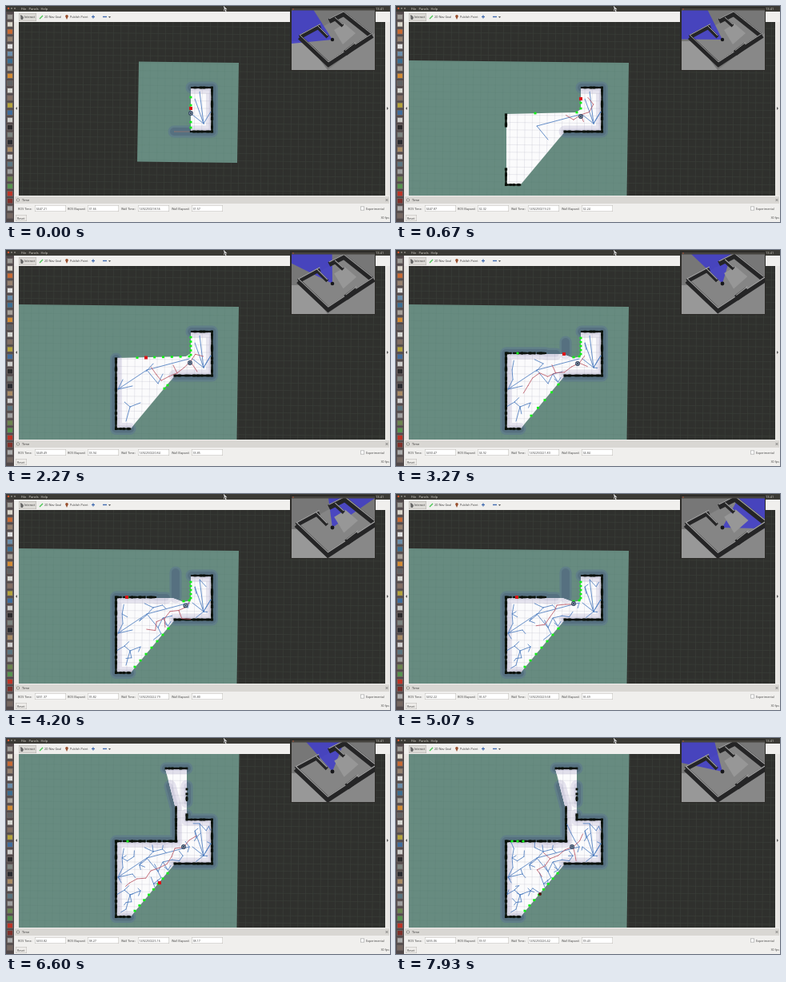
Animation of 480x270 px, one loop 8000 ms. Source, as an HTML page with a canvas:

```html
<!DOCTYPE html>
<html lang="en">
<head>
<meta charset="utf-8">
<title>Map exploration</title>
<style>
html, body { margin: 0; width: 100%; height: 100%; overflow: hidden; background: #30302e; }
canvas { display: block; width: 480px; height: 270px; }
</style>
</head>
<body>
<canvas id="stage" width="480" height="270"></canvas>
<script>
const ctx = document.getElementById('stage').getContext('2d');
const LOOP = 8000, STEP = 200 / 3;
const TIMES = [0, 670, 2270, 3270, 5070, 6600, 7930];

function seeded(seed) {
  return () => {
    seed = (seed * 1664525 + 1013904223) >>> 0;
    return seed / 4294967296;
  };
}

// Linear interpolation between the values listed at TIMES.
function at(values, t) {
  let i = 0;
  while (i < TIMES.length - 2 && t >= TIMES[i + 1]) i++;
  const k = (t - TIMES[i]) / (TIMES[i + 1] - TIMES[i]);
  return values[i] + (values[i + 1] - values[i]) * k;
}

function rect(x, y, w, h, color) {
  ctx.fillStyle = color;
  ctx.fillRect(x, y, w, h);
}

function trace(p, close) {
  ctx.beginPath();
  for (let i = 0; i < p.length; i += 2) ctx.lineTo(p[i], p[i + 1]);
  if (close) ctx.closePath();
}

function poly(p, color) {
  trace(p, true);
  ctx.fillStyle = color;
  ctx.fill();
}

function line(p, color, width = 1) {
  trace(p);
  ctx.strokeStyle = color;
  ctx.lineWidth = width;
  ctx.stroke();
}

function dot(x, y, r, color) {
  ctx.beginPath();
  ctx.arc(x, y, r, 0, 7);
  ctx.fillStyle = color;
  ctx.fill();
}

function text(s, x, y, color = '#3c3c3c', size = 3.7) {
  ctx.font = size + 'px "Open Sans", sans-serif';
  ctx.fillStyle = color;
  ctx.fillText(s, x, y);
}

// Known free space, from the first room to the final corridor.
const STAGES = [
  { start: 0, free: [231, 103, 257, 103, 257, 157, 231, 157] },
  { start: 330, free: [231, 103, 257, 103, 257, 157, 211, 157, 156, 223, 138, 223, 138, 135, 225, 133, 231, 129] },
  { start: 2730, free: [231, 103, 257, 103, 257, 157, 211, 157, 156, 223, 138, 223, 138, 130, 208, 130, 222, 135, 231, 133] },
  { start: 5530, free: [226, 38, 226, 103, 257, 103, 257, 157, 211, 157, 156, 223, 138, 223, 138, 130, 213, 130, 212, 88, 199, 38] }
];
const stageAt = t => STAGES.filter(s => s.start <= t).pop();

// Obstacles: black cells from `start`, inflated cost band from `halo`.
const WALLS = [
  { start: 0, halo: 0, p: [232, 102, 257.5, 102, 257.5, 157, 231, 157] },
  { start: 330, halo: 0, p: [231, 157, 211, 157] },
  { start: 330, halo: 1100, p: [137.5, 136, 137.5, 150] },
  { start: 330, halo: 1100, p: [137.5, 204, 137.5, 223.5, 155, 223.5] },
  { start: 1100, halo: 1100, p: [137.5, 150, 137.5, 204] },
  { start: 2730, halo: 2730, gaps: .2, p: [137.5, 129, 187, 129] },
  { start: 2730, halo: 2730, p: [137.5, 129, 137.5, 136] },
  { start: 9e9, halo: 2730, p: [187, 130, 200, 130] },
  { start: 5530, halo: 5530, gaps: .15, p: [187, 129, 213, 129] },
  { start: 5530, halo: 5530, p: [212.5, 129, 212.5, 86] },
  { start: 9e9, halo: 5530, p: [212, 86, 205, 60] },
  { start: 5530, halo: 5530, p: [200, 38, 226, 38] },
  { start: 5530, halo: 5530, gaps: .55, p: [226, 60, 226, 80] },
  { start: 5530, halo: 5530, p: [226, 96, 226, 102, 232, 102] }
];

function cells(p, gaps = 0) {
  const rnd = seeded(p[0] * 31 + p[1]), out = [];
  for (let i = 0; i + 3 < p.length; i += 2) {
    const [x, y, x2, y2] = p.slice(i, i + 4), n = Math.ceil(Math.hypot(x2 - x, y2 - y) / 2);
    for (let j = 0; j <= n; j++) {
      const size = 2 + rnd() * 1.3, skip = rnd() < gaps;
      if (!skip) out.push([x + (x2 - x) * j / n, y + (y2 - y) * j / n, size]);
    }
  }
  return out;
}
WALLS.forEach(w => { w.cells = cells(w.p, w.gaps); });

// Exploration tree: a few early branches, then seeded random growth.
const TREE = [];
const NODES = [];
function branch(start, p) {
  for (let i = 0; i + 3 < p.length; i += 2) TREE.push({ start, p: p.slice(i, i + 4) });
  for (let i = 0; i < p.length; i += 2) NODES.push([p[i], p[i + 1]]);
}
branch(0, [242, 107, 247, 147, 233, 136]);
branch(0, [236, 116, 247, 147, 256, 132]);
branch(400, [229, 136, 176, 150, 190, 167]);
branch(530, [256, 132, 251, 140, 247, 147]);
branch(930, [176, 150, 140, 174, 158, 170]);
branch(1200, [140, 174, 146, 162]);
branch(1400, [148, 190, 155, 196, 150, 214]);
branch(1700, [155, 196, 168, 191]);
branch(1930, [184, 142, 175, 152]);
branch(2130, [190, 167, 196, 155]);

function inside(p, x, y) {
  trace(p, true);
  return ctx.isPointInPath(x, y);
}

function grow(nodes, rnd, free, reach) {
  for (let tries = 0; tries < 60; tries++) {
    const x = 138 + rnd() * 120, y = 104 + rnd() * 119;
    if (!inside(free, x, y)) continue;
    let near = nodes[0], best = 1e9;
    for (const n of nodes) {
      const d = Math.hypot(n[0] - x, n[1] - y);
      if (d < best) { best = d; near = n; }
    }
    if (best < 4) continue;
    const k = Math.min(1, reach / best);
    const end = [near[0] + (x - near[0]) * k, near[1] + (y - near[1]) * k];
    if (!inside(free, (near[0] + end[0]) / 2, (near[1] + end[1]) / 2)) continue;
    nodes.push(end);
    return [...near, ...end];
  }
  return [0, 0, 0, 0];
}

const treeRnd = seeded(77);
for (let t = 2330; t < LOOP; t += 78) {
  TREE.push({ start: t, p: grow(NODES, treeRnd, stageAt(t).free, 12) });
}

const robotX = t => at([231, 231, 230, 227, 222, 222, 220], t);
const robotY = t => at([134, 138, 141, 142, 137, 136, 136], t);

// Local tree around the robot, restarted now and then.
const LOCAL = [];
for (let t = 330; t < LOOP; t += 1100) {
  const nodes = [[robotX(t), robotY(t)]], rnd = seeded(t + 9);
  for (let i = 0; i < 11; i++) {
    LOCAL.push({ start: t + i * 60, end: t + 1100, p: grow(nodes, rnd, stageAt(t).free, 11) });
  }
}

function drawGrid(color) {
  ctx.save();
  ctx.translate(245, 128);
  ctx.rotate(.011);
  ctx.beginPath();
  for (let i = -30; i <= 30; i++) {
    const d = i * 9.3;
    ctx.moveTo(d, -160); ctx.lineTo(d, 160);
    ctx.moveTo(-280, d); ctx.lineTo(280, d);
  }
  ctx.strokeStyle = color;
  ctx.lineWidth = .7;
  ctx.stroke();
  ctx.restore();
}

function drawHalos(t, color, width) {
  ctx.beginPath();
  for (const w of WALLS) {
    if (t < w.halo || (w.halo === 0 && w.start > t)) continue;
    ctx.moveTo(w.p[0], w.p[1]);
    for (let i = 2; i < w.p.length; i += 2) ctx.lineTo(w.p[i], w.p[i + 1]);
  }
  if (t < 330) { ctx.moveTo(231, 157); ctx.lineTo(210, 157); }
  if (t >= 2730 && t < 5530) {
    ctx.moveTo(212, 129);
    ctx.lineTo(212, t < 3900 ? 115 : 98);
  }
  ctx.strokeStyle = color;
  ctx.lineWidth = width;
  ctx.stroke();
}

function greens(x, y, x2, y2, n) {
  for (let i = 0; i < n; i++) {
    const k = n > 1 ? i / (n - 1) : 0;
    rect(x + (x2 - x) * k - 1.5, y + (y2 - y) * k - 1.3, 3, 2.7, '#12ef18');
  }
}

function drawFrontiers(t) {
  if (t < 330) {
    greens(231, 114, 231, 124, 2);
    greens(231, 145, 231, 152, 2);
  } else if (t < 1100) {
    greens(231, 121, 231, 128, 2);
    greens(174, 134, 226, 133, 2);
  } else if (t < 2730) {
    greens(164, 134.5, 229, 133, 7);
    greens(231, 109, 231, 131, 5);
    greens(198, 173, 202, 169, 2);
  } else if (t < 5530) {
    greens(231, 110, 231, 130, 5);
    greens(222, 134, 229, 133, 2);
    greens(t < 3900 ? 169 : 161, t < 3900 ? 207 : 216, 203, 168, t < 3900 ? 5 : 7);
    greens(152, 129, 152, 129, 1);
  } else {
    greens(161, 216, 202, 169, 8);
    greens(t < 7000 ? 152 : 145, 129, t < 7000 ? 152 : 159, 129, t < 7000 ? 1 : 3);
  }
}

const GOALS = [[0, 231, 128], [530, 231, 116], [1330, 175, 134.5], [2730, 210, 130], [3930, 151, 129], [5530, 192, 181], [7330, 180, 195]];

function drawMap(t) {
  ctx.save();
  ctx.beginPath();
  ctx.rect(16, 20, 458, 217);
  ctx.clip();
  rect(16, 20, 458, 217, '#2f302d');
  drawGrid('#3b3c38');
  const teal = '#678b80';
  if (t < 330) poly([166, 69.5, 291, 71, 289, 196, 164, 194.5], teal);
  else if (t < 5530) poly([16, 68, 291, 71, 288.5, 237, 16, 237], teal);
  else poly([16, 20, 291.5, 20, 288.5, 237, 16, 237], teal);
  drawGrid('rgba(60,90,82,.08)');

  ctx.lineJoin = ctx.lineCap = 'round';
  drawHalos(t, '#607f88', 15);
  drawHalos(t, '#567080', 10);
  const free = stageAt(t).free;
  poly(free, '#fbfbfc');
  ctx.save();
  trace(free, true);
  ctx.clip();
  drawHalos(t, '#e5e3ee', 15);
  drawHalos(t, '#d5d3e3', 7);
  drawGrid('rgba(150,150,170,.25)');
  ctx.restore();

  if (t < 330) line([210, 157, 231, 157], '#8b7470', 1);
  for (const w of WALLS) {
    if (t < w.start) continue;
    for (const [x, y, s] of w.cells) rect(x - s / 2, y - s / 2, s, s, '#0b120b');
  }
  for (const e of TREE) if (t >= e.start) line(e.p, '#4c7dc0', .85);
  for (const e of LOCAL) if (t >= e.start && t < e.end) line(e.p, '#b8505e', .8);
  drawFrontiers(t);

  const [, gx, gy] = GOALS.filter(g => g[0] <= t).pop();
  if (t >= 7330) dot(gx, gy, 2, '#501810');
  else rect(gx - 2, gy - 2, 4, 4, '#dc1418');

  const x = robotX(t), y = robotY(t);
  dot(x, y, 2.9, '#34445e');
  dot(x, y, 1.8, '#9db4cc');
  dot(x, y, .9, '#1d2530');
  ctx.restore();
}

function wall(p, width) {
  line(p, '#252526', width);
  ctx.save();
  ctx.translate(0, -width / 2);
  line(p, '#a4a4a4', 1);
  ctx.restore();
}

function drawCamera(t) {
  rect(355, 1, 107, 80, '#2d2c29');
  ctx.save();
  ctx.beginPath();
  ctx.rect(357, 5, 104, 75);
  ctx.clip();
  rect(357, 5, 104, 75, '#777');
  poly([357, 44, 375, 44, 402, 80, 357, 80], '#989898');
  poly([461, 34, 461, 80, 402, 80], '#888');

  ctx.translate(408, 42);
  const zoom = at([1, 1, 1.04, 1.08, 1.12, 1.12, 1.12], t);
  ctx.scale(zoom, zoom);
  ctx.translate(-408, -42);
  ctx.lineJoin = 'miter';
  ctx.lineCap = 'butt';
  poly([370, 40, 421, 12, 454, 39, 403, 72], '#858585');
  const dir = at([206, 212, 238, 255, 330, 260, 222], t) * Math.PI / 180;
  ctx.beginPath();
  ctx.moveTo(408, 42);
  ctx.arc(408, 42, 62, dir - .55, dir + .55);
  ctx.fillStyle = 'rgba(62,58,205,.82)';
  ctx.fill();
  poly([410, 30, 423, 22, 437, 34, 421, 48], '#979797');
  wall([367, 39, 393, 25], 5);
  wall([404, 19, 422, 10, 456, 37], 6);
  wall([367, 39, 403, 73, 458, 37], 6);
  wall([389, 26, 402, 39], 4);
  wall([411, 16, 421, 25], 4);
  wall([424, 59, 437, 49], 7);
  dot(408, 42, 2.2, '#17171a');
  ctx.restore();
  rect(357, 3, 104, 2.5, '#45433e');
  dot(359, 4, .7, '#d65d37');
}

const ICONS = ['#9b9994', '#dad6cb', '#c66a35', '#95816f', '#ddd', '#6b8da9', '#3c6e91', '#a7a199', '#d18b36', '#5f6264',
  '#d4d4cf', '#836f64', '#b4a33d', '#406c9b', '#cbcbc8', '#2d2b2d', '#7b837f', '#2a2b30', '#a78a65', '#ccc',
  '#5b7480', '#9d9d9d', '#6c8550', '#56934f', '#bd3528', '#7e312c', '#aaa', '#766861'];

function field(label, value, x, boxX) {
  text(label, x, 254.5);
  rect(boxX, 249, 39, 8, '#b9b6b1');
  rect(boxX + .5, 249.5, 38, 7, '#fff');
  text(value, boxX + 1.5, 254.5);
}

function drawWindow(t) {
  rect(0, 0, 480, 7, '#3b3a35');
  rect(0, 7, 10, 263, '#51494a');
  ICONS.forEach((c, i) => {
    rect(1, 10 + i * 9.2, 8, 7.4, '#6a6261');
    rect(2, 11 + i * 9.2, 6, 5.4, c);
  });
  dot(3, 3, 1.3, '#d6562f');
  dot(7, 3, 1.1, '#85837c');
  dot(11, 3, 1.1, '#85837c');
  text('File', 19, 4.7, '#d4d1c8', 4);
  text('Panels', 28.5, 4.7, '#d4d1c8', 4);
  text('Help', 43.5, 4.7, '#d4d1c8', 4);
  text('13:41', 462, 4.7, '#d4d1c8', 4);

  rect(10, 7, 470, 13, '#f0efed');
  rect(10, 20, 6, 217, '#e9e7e4');
  rect(474, 20, 6, 217, '#e9e7e4');
  poly([14, 126, 14, 130, 12, 128], '#555');
  poly([476, 126, 476, 130, 478, 128], '#555');

  rect(16, 9, 22, 10, '#b5b2ad');
  rect(16.5, 9.5, 21, 9, '#dcdad6');
  poly([18, 11, 20, 12, 22, 14, 21, 17, 18.5, 17], '#666');
  text('Interact', 23, 15, '#333');
  line([42, 16, 46, 12], '#46c650', 1.2);
  text('2D Nav Goal', 48, 15);
  dot(76, 12.8, 1.8, '#99502e');
  poly([74.5, 13.5, 77.5, 13.5, 76, 17], '#99502e');
  text('Publish Point', 80, 15);
  line([107, 13.5, 111, 13.5], '#416bb0', 1.2);
  line([109, 11.5, 109, 15.5], '#416bb0', 1.2);
  line([121, 13.5, 126, 13.5], '#416bb0', 1.4);
  poly([128, 13, 131, 13, 129.5, 15], '#555');

  rect(10, 237, 470, 33, '#f0efed');
  rect(11, 238, 468, 9, '#d9d7d3');
  dot(15, 242.5, 2, '#77756f');
  dot(15, 242.5, 1.2, '#eee');
  text('Time', 20, 244, '#333', 4);
  line([474.5, 241, 477.5, 244], '#666', .7);
  line([477.5, 241, 474.5, 244], '#666', .7);

  const ros = at([0, .66, 2.28, 3.26, 5.01, 6.61, 7.91], t);
  const wallTime = at([0, .67, 2.28, 3.27, 5.12, 6.6, 7.92], t);
  field('ROS Time:', (3447.21 + ros).toFixed(2), 15, 36);
  field('ROS Elapsed:', (31.66 + ros).toFixed(2), 77, 102);
  field('Wall Time:', (1492250218.56 + wallTime).toFixed(2), 144, 165);
  field('Wall Elapsed:', (31.57 + wallTime).toFixed(2), 207, 232);
  rect(443, 250.5, 5, 5, '#aaa');
  rect(443.7, 251.2, 3.6, 3.6, '#fff');
  text('Experimental', 450, 254.5);
  rect(12, 261, 14, 8, '#bab7b2');
  rect(12.5, 261.5, 13, 7, '#eeece9');
  text('Reset', 14, 266.5);
  text('30 fps', 468.5, 265.5);
}

function drawCursor() {
  poly([272, 0, 272, 6, 273.4, 4.8, 274.5, 7, 275.6, 6.4, 274.6, 4.3, 276.4, 4.2], '#fff');
  line([272.6, 1.5, 272.6, 4.5, 275, 4], '#222', .7);
}

function frame(now) {
  const t = Math.floor((now % LOOP) / STEP + .01) * STEP;
  drawWindow(t);
  drawMap(t);
  drawCamera(t);
  drawCursor();
  requestAnimationFrame(frame);
}
frame(0);
</script>
</body>
</html>
```
